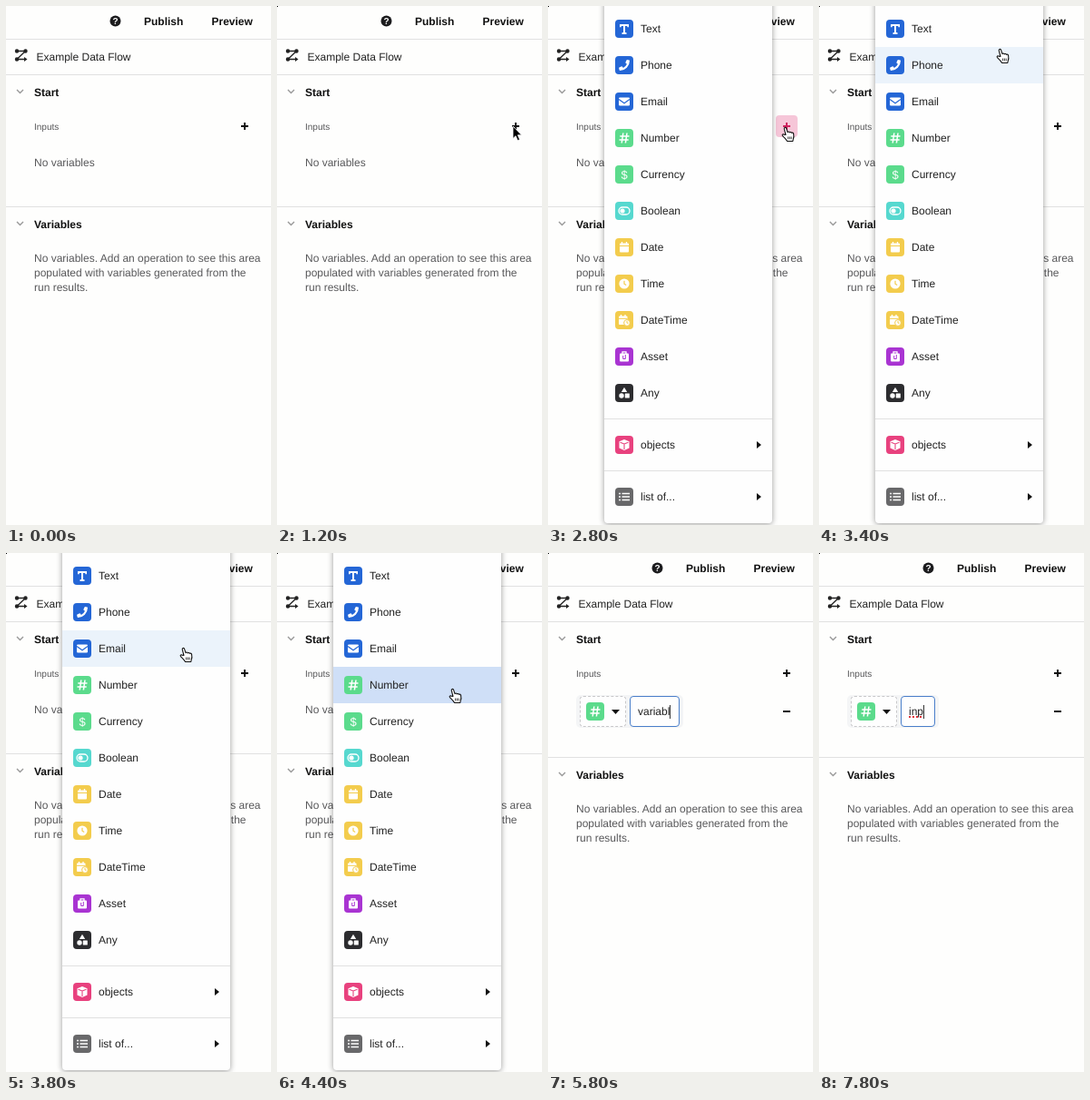
Animation of 292x570 px, one loop 8 s. Source, as an HTML page:

```html
<!DOCTYPE html>
<html lang="en">
<head>
<meta charset="utf-8">
<title>Data flow inputs</title>
<style>
html, body { margin: 0; width: 100%; height: 100%; overflow: hidden; background: #fefefd; }
body { position: relative; font: 12px/14px "Liberation Sans", Arial, sans-serif; color: #222; text-rendering: geometricPrecision; }
svg { display: block; }
.layer { position: absolute; left: 0; top: 0; }
.bold { font-weight: bold; fill: #111; }
text { fill: #222; }
.soft text, text.soft { fill: #58585a; }
.rule { stroke: #e1e1e1; }
.chev { fill: none; stroke: #999; stroke-width: 1.4; }

/* every state is held for 200 ms = 2.5% */
.dot, .hint, .rest, .hot, .menu, .mark, .row, .minus, .cursor, .arrow, .hand, .vars, .typed::before {
  animation: 8s step-end infinite;
}
.dot { animation-name: dot; }
.hint { animation-name: hint; }
.rest { animation-name: rest; }
.hot { animation-name: hot; }
.menu { animation-name: menu; filter: drop-shadow(0 1px 3px #0006); }
.mark { animation-name: mark; }
.row, .minus { animation-name: row; }
.cursor { animation-name: move; }
.arrow { animation-name: arrow; }
.hand { animation-name: hand; }
.vars { animation-name: shift; }

@keyframes dot { 0% { opacity: 0 } 2.5%, 100% { opacity: 1 } }
@keyframes hint { 0% { opacity: 1 } 57.5%, 100% { opacity: 0 } }
@keyframes row { 0% { opacity: 0 } 57.5%, 100% { opacity: 1 } }
@keyframes rest { 0% { opacity: 1 } 17.5% { opacity: 0 } 37.5%, 100% { opacity: 1 } }
@keyframes hot { 0% { opacity: 0 } 17.5% { opacity: 1 } 37.5%, 100% { opacity: 0 } }
@keyframes menu { 0% { opacity: 0 } 22.5% { opacity: 1 } 57.5%, 100% { opacity: 0 } }
@keyframes shift { 0% { transform: none } 57.5%, 100% { transform: translateY(4px) } }
@keyframes mark {
  0% { opacity: 0; transform: none; fill: #ebf3fb }
  37.5% { opacity: 1; transform: translateY(85px); fill: #ebf3fb }
  40% { opacity: 1; transform: translateY(45px); fill: #ebf3fb }
  47.5% { opacity: 1; transform: translateY(85px); fill: #ebf3fb }
  50% { opacity: 1; transform: translateY(125px); fill: #ebf3fb }
  55%, 100% { opacity: 1; transform: translateY(125px); fill: #cfdff7 }
}
@keyframes arrow { 0% { opacity: 0 } 5% { opacity: 1 } 17.5% { opacity: 0 } 57.5% { opacity: 1 } 70%, 100% { opacity: 0 } }
@keyframes hand { 0% { opacity: 0 } 17.5% { opacity: 1 } 57.5%, 100% { opacity: 0 } }
@keyframes move {
  0% { transform: translate(168px, 238px) }
  7.5% { transform: translate(205px, 205px) }
  10% { transform: translate(236px, 168px) }
  12.5% { transform: translate(254px, 142px) }
  15% { transform: translate(260px, 132px) }
  17.5% { transform: translate(261px, 133px) }
  37.5% { transform: translate(238px, 95px) }
  40% { transform: translate(218px, 68px) }
  42.5% { transform: translate(199px, 47px) }
  45% { transform: translate(197px, 68px) }
  47.5% { transform: translate(195px, 104px) }
  50% { transform: translate(194px, 138px) }
  52.5%, 100% { transform: translate(193px, 149px) }
}
@keyframes type {
  0% { content: "variable" }
  72.5% { content: "variabl" }
  75% { content: "variab" }
  77.5% { content: "varia" }
  80% { content: "vari" }
  82.5% { content: "var" }
  85% { content: "va" }
  87.5% { content: "v" }
  90% { content: "" }
  92.5% { content: "i" }
  95% { content: "in" }
  97.5%, 100% { content: "inp" }
}
@keyframes spell {
  0% { text-decoration-color: transparent }
  97.5%, 100% { text-decoration-color: #e0383e }
}

.row { position: absolute; left: 31px; top: 156px; height: 34px; padding: 1px 4px; display: flex; background: #f4f5f6; border-radius: 5px; }
.kind, .name { box-sizing: border-box; height: 34px; border-radius: 4px; background: #fefefe; }
.kind { width: 51px; margin-right: 4px; border: 1px dashed #c8c8ca; }
.name { min-width: 38px; padding: 0 8.7px 0 8px; border: 1px solid #4a7fca; display: flex; align-items: center; }
.typed::before {
  content: "variable";
  animation-name: type, spell;
  text-decoration: underline dotted 2px transparent;
  text-underline-offset: 1px;
  text-decoration-skip-ink: none;
}
.caret { width: 1px; height: 15px; background: #333; }
</style>
</head>
<body>
<svg class="layer" width="292" height="570">
  <path class="rule" d="M0 36.5h292M0 75.5h292"/>
  <circle cx="120.5" cy="16.5" r="6" fill="#1c1c1e"/>
  <text x="120.5" y="20" text-anchor="middle" font-size="10" font-weight="bold" style="fill:#fff">?</text>
  <text class="bold" x="152" y="21">Publish</text>
  <text class="bold" x="226.5" y="21">Preview</text>

  <g fill="#222" stroke="#222" stroke-width="1.4">
    <path d="M12 49.5h9.5L12 58.5h9" fill="none"/>
    <path d="M20 56l3.5 2.5L20 61z" stroke="none"/>
    <circle cx="12" cy="49.5" r="1.5"/><circle cx="21.5" cy="49.5" r="1.5"/><circle cx="12" cy="58.5" r="1.5"/>
  </g>
  <text x="33.5" y="60">Example Data Flow</text>

  <path class="chev" d="M12 92l3.5 3.5L19 92"/>
  <text class="bold" x="31" y="99">Start</text>
  <text class="soft" x="31" y="136" font-size="10">Inputs</text>
  <path class="rest" d="M259 132h8M263 128v8" stroke="#111" stroke-width="2"/>
  <g class="hot">
    <rect x="251" y="120" width="24" height="24" rx="4" fill="#f6c6d8"/>
    <path d="M259 132h8M263 128v8" stroke="#d0225f" stroke-width="2"/>
  </g>
  <text class="soft hint" x="31" y="176">No variables</text>
  <path class="minus" d="M259 174h8" stroke="#111" stroke-width="2"/>

  <g class="vars">
    <path class="rule" d="M0 220.5h292"/>
    <path class="chev" d="M12 237l3.5 3.5L19 237"/>
    <text class="bold" x="31" y="244">Variables</text>
    <g class="soft">
      <text x="31" y="281">No variables. Add an operation to see this area</text>
      <text x="31" y="297">populated with variables generated from the</text>
      <text x="31" y="313">run results.</text>
    </g>
  </g>
</svg>

<div class="row">
  <div class="kind"><svg id="kind" width="49" height="32"><path d="M34 14h9l-4.5 5z" fill="#111"/></svg></div>
  <div class="name"><span class="typed"></span><i class="caret"></i></div>
</div>

<svg class="layer" width="292" height="570">
  <g class="menu">
    <rect x="62" y="-10" width="185" height="578" rx="4" fill="#fefefe"/>
    <rect class="mark" x="62" width="185" height="40"/>
    <path class="rule" d="M62 453.5h185M62 510.5h185"/>
    <g id="items"></g>
    <path d="M230 478l5 4-5 4zM230 535l5 4-5 4z" fill="#111"/>
  </g>
  <rect class="dot" width="1" height="1"/>
  <g class="cursor">
    <path class="arrow" d="M0 0v13.5l3-2.8 2.200 5 2.300-1-2.200-4.900h4.200z" fill="#000" stroke="#fff" stroke-width=".8"/>
    <g class="hand" transform="translate(-4 -1)" stroke="#111" stroke-linejoin="round">
      <path d="M5 9.5L3.3 3.2C2.9 1.3 5 .6 5.6 2.4L7 6.6c.7-.9 1.9-.7 2.2.3.8-.8 1.9-.4 2.2.5 1-.6 2 0 2.2 1 .4 2 .6 3.6-.3 5.6l-.5 2.5H6.6C5.6 14.6 3.4 12.4 1.5 10.6c-.9-1 .2-2.2 1.5-1.5z" fill="#fff" stroke-width="1.1"/>
      <path d="M7.6 11.5v2.8M9.4 11.5v2.8M11.2 11.5v2.8" stroke-width=".8"/>
    </g>
  </g>
</svg>

<script>
// Icons sit in a 20 x 20 tile; currentColor is the tile colour.
const line = (d, w = 1.3, c = "#fff") => `<path d="${d}" fill="none" stroke="${c}" stroke-width="${w}"/>`;
const cut = (d, w = 1) => line(d, w, "currentColor");
const box = (x, y, w, h, r = 1) => `<rect x="${x}" y="${y}" width="${w}" height="${h}" rx="${r}"/>`;
const disc = (x, y, r) => `<circle cx="${x}" cy="${y}" r="${r}"/>`;
const blue = "#2466d6", green = "#5bdb8c", yellow = "#f3cc4d";
const hash = line("M8.8 4.5L7.2 15.5M13 4.5l-1.6 11M5.3 8h10.2M4.5 12h10.2", 1.5);

const types = [
  ["Text", blue, '<path d="M5 5h10v3.2h-1.5L13.2 7H11v7l1.5.3V16h-5v-1.7L9 14V7H6.8l-.3 1.2H5z"/>'],
  ["Phone", blue, '<path d="M15.6 4.6l-2.4-.6-.7.4-1.1 2.6.2.7 1.4 1.1a8.5 8.5 0 0 1-4.1 4.1l-1.1-1.4-.7-.2-2.6 1.1-.4.7.6 2.4.6.5A11 11 0 0 0 16 5.1z"/>'],
  ["Email", blue, box(4, 5.5, 12, 9, 1.3) + cut("M4 7.5l6 4.2 6-4.2", 1.2)],
  ["Number", green, hash],
  ["Currency", green, '<text x="10" y="14.5" text-anchor="middle" font-size="13" style="fill:#fff">$</text>'],
  ["Boolean", "#56d8cf", '<rect x="4" y="6" width="12" height="8" rx="4" fill="none" stroke="#fff" stroke-width="1.3"/>' + disc(8, 10, 2.6)],
  ["Date", yellow, box(5, 5.5, 10, 10) + line("M7.5 4v2M12.5 4v2") + cut("M5 8.5h10")],
  ["Time", yellow, disc(10, 10, 5.6) + cut("M10 6.8v3.4l2.2 1.3", 1.2)],
  ["DateTime", yellow, box(4, 5.5, 9.5, 9.5) + line("M6.5 4v2M11 4v2") + cut("M4 8.3h9.5") +
    '<circle cx="13" cy="13" r="3.4" stroke="currentColor"/>' + cut("M13 11v2.2h1.5")],
  ["Asset", "#a934d2", box(5, 6.5, 10, 9) + line("M8 7V4.8h4V7") + cut("M8.7 9v3.5h2.6V8")],
  ["Any", "#2c2c2f", '<path d="M10 3.8l3.2 5.2H6.8z"/>' + disc(7, 13, 2.7) + box(10.8, 10.5, 5, 5, .5)],
  ["objects", "#e8417e", '<path d="M10 4l5.5 2.2v7.3L10 16l-5.5-2.5V6.2z"/>' + cut("M5.5 7.2L10 9l4.5-1.8M10 9v6", 1.1)],
  ["list of...", "#68686a", line("M7.5 6.5H16M7.5 10H16M7.5 13.5H16", 1.5) + line("M4 6.5h2M4 10h2M4 13.5h2", 1.6)]
];

const tile = (x, y, color, art) =>
  `<g transform="translate(${x} ${y})" fill="#fff" color="${color}">
    <rect width="20" height="20" rx="4" fill="currentColor"/>${art}</g>`;

document.getElementById("items").innerHTML = types.map(([label, color, art], i) => {
  const y = i < 11 ? 25 + 40 * i : 482 + 57 * (i - 11);
  return tile(74, y - 10, color, art) + `<text x="102" y="${y + 4}">${label}</text>`;
}).join("");
document.getElementById("kind").insertAdjacentHTML("beforeend", tile(6, 6, green, hash));
</script>
</body>
</html>
```
